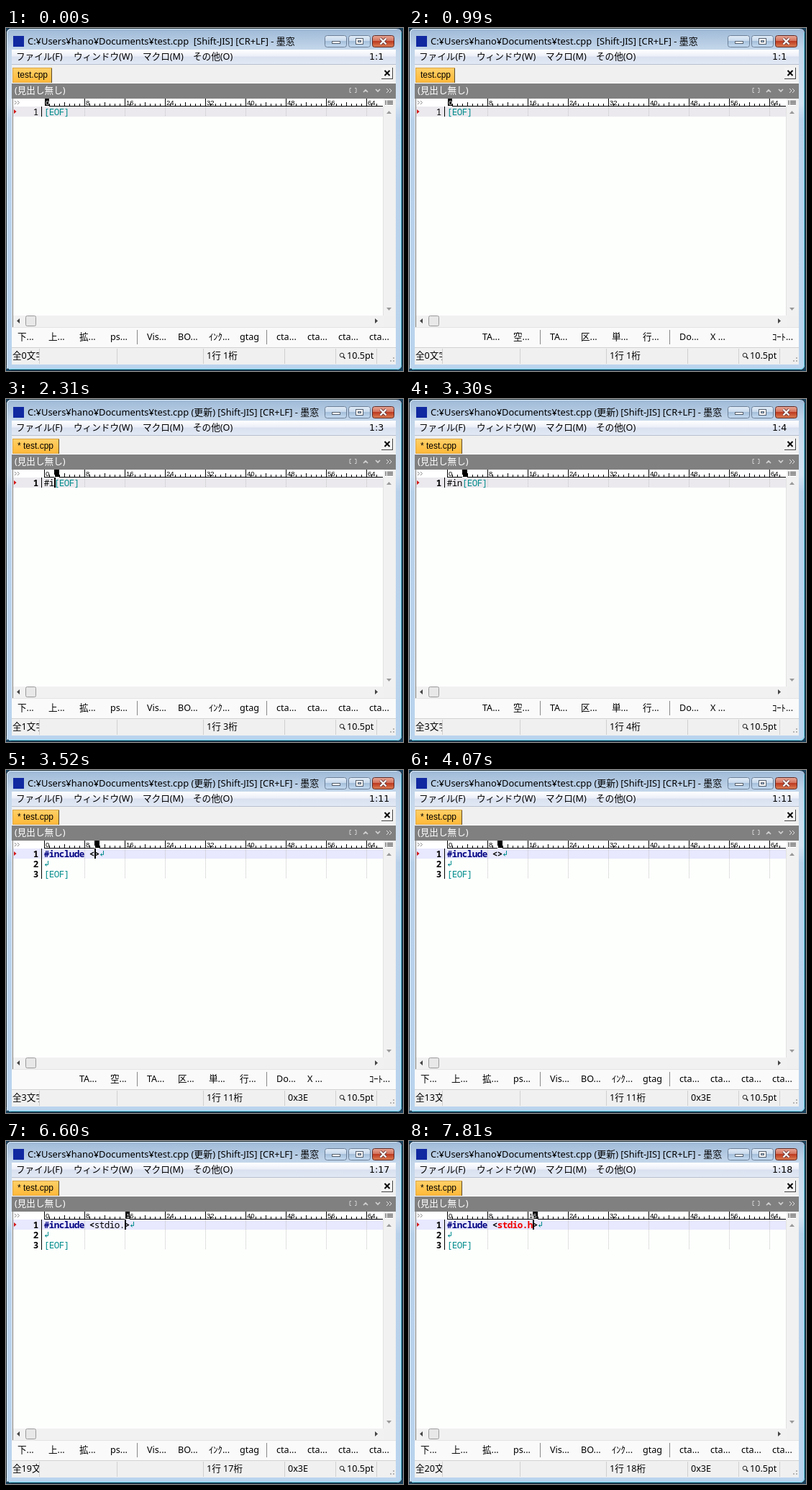
These frames come from a looping animation (552 px wide and 476 px high, 8000 ms). An HTML page:

```html
<!DOCTYPE html>
<html lang="ja">
<head>
<meta charset="utf-8">
<style>
html, body { margin: 0; width: 552px; height: 476px; overflow: hidden; }
svg { display: block; }
text { font: 12.6px "Noto Sans", "Noto Sans CJK JP", sans-serif; white-space: pre; }
.title { font-size: 12.9px; }
.tab { font: 12px "Liberation Sans", sans-serif; }
.ruler { font: 9.5px "Liberation Sans", sans-serif; }
.pos { font: 12.6px "DejaVu Sans", sans-serif; }
.code { font: 12.6px "Noto Sans Mono", monospace; text-anchor: middle; }
.bold { font-weight: bold; }
rect { shape-rendering: crispEdges; }
.round { shape-rendering: auto; }
.invert { mix-blend-mode: difference; }
</style>
</head>
<body>
<svg width="552" height="476">
  <defs>
    <linearGradient id="glass" x2="0" y2="1">
      <stop stop-color="#9db8d6"/><stop offset=".06" stop-color="#c3d6ea"/><stop offset=".22" stop-color="#d3e2f2"/>
      <stop offset=".27" stop-color="#b9d1ea"/><stop offset="1" stop-color="#bad4ee"/>
    </linearGradient>
    <linearGradient id="menu" x2="0" y2="1">
      <stop stop-color="#fff"/><stop offset=".45" stop-color="#eceff8"/><stop offset=".5" stop-color="#d9e0ef"/><stop offset="1" stop-color="#e2e9f5"/>
    </linearGradient>
    <linearGradient id="button" x2="0" y2="1">
      <stop stop-color="#e3edf8"/><stop offset=".48" stop-color="#c6d8ec"/><stop offset=".5" stop-color="#a6bfda"/><stop offset="1" stop-color="#c5dcf2"/>
    </linearGradient>
    <linearGradient id="close" x2="0" y2="1">
      <stop stop-color="#e8a898"/><stop offset=".48" stop-color="#d2705a"/><stop offset=".5" stop-color="#bd3a20"/><stop offset="1" stop-color="#dd8055"/>
    </linearGradient>
    <linearGradient id="tab" x2="0" y2="1">
      <stop stop-color="#ffd068"/><stop offset="1" stop-color="#ffb938"/>
    </linearGradient>
  </defs>
  <g id="frame"></g>
  <g id="live"></g>
</svg>
<script>
const LOOP = 8000, LEFT = 53, CELL = 7, LINE = 14;
const TEAL = '#008c8c', NAVY = '#000080';

const escape = s => s.replace(/</g, '&lt;').replace(/>/g, '&gt;');
const rect = (x, y, w, h, fill, extra = '') =>
  `<rect x="${x}" y="${y}" width="${w}" height="${h}" fill="${fill}" ${extra}/>`;
const text = (x, y, s, cls = '', fill = '#000') =>
  `<text x="${x}" y="${y}" class="${cls}" fill="${fill}">${escape(s)}</text>`;
const line = (d, color, width = 1, extra = '') =>
  `<path d="${d}" fill="none" stroke="${color}" stroke-width="${width}" ${extra}/>`;
const shape = (d, fill) => `<path d="${d}" fill="${fill}"/>`;
const repeat = (n, f) => Array.from({ length: n }, (_, i) => f(i)).join('');

// Text on the fixed character grid
function code(col, row, s, fill = '#000', bold = false) {
  const xs = [...s].map((_, i) => LEFT + (col + i + .5) * CELL).join(' ');
  return text(xs, 120.5 + row * LINE, s, bold ? 'code bold' : 'code', fill);
}

function windowFrame() {
  return rect(0, 0, 552, 476, '#17405c')
    + rect(.5, .5, 550, 474, 'url(#glass)', 'rx="6" class="round" stroke="#16242f"')
    + line('M1.500 473V8q0-6.500 6-6.500h536', '#e0f0fa')
    + line('M549.500 6v461q0 6.500-6 6.500H4', '#5cd4f2')
    + rect(10, 11, 15, 15, '#1028a0')
    + rect(443.5, 10.5, 30, 16, 'url(#button)', 'rx="3" class="round" stroke="#6c8098"')
    + rect(476.5, 10.5, 30, 16, 'url(#button)', 'rx="3" class="round" stroke="#6c8098"')
    + rect(509.5, 10.5, 30, 16, 'url(#close)', 'rx="3" class="round" stroke="#5f2a26"')
    + rect(453.5, 18.5, 11, 3, '#fff', 'stroke="#55606e"')
    + rect(486.5, 14.5, 10, 8, '#fff', 'stroke="#55606e"')
    + rect(489.5, 17.5, 4, 2, '#a6bfda', 'stroke="#55606e"')
    + line('M520.5 14.5l8 8m0-8l-8 8', '#6a3a3a', 4)
    + line('M520.5 14.5l8 8m0-8l-8 8', '#fff', 2.3)
    + rect(8, 30, 534, 437, '#f0f0f0')
    + rect(8, 30, 534, 20, 'url(#menu)')
    + rect(8, 50, 534, 1, '#b8c0cf')
    + text(14, 44, 'ファイル(F)') + text(94, 44, 'ウィンドウ(W)')
    + text(190, 44, 'マクロ(M)') + text(260, 44, 'その他(O)');
}

function header() {
  return rect(522, 55, 16, 16, '#444') + rect(522, 55, 15, 15, '#f4f4f4')
    + line('M526.5 59l7 7m0-7l-7 7', '#000', 2)
    + rect(8, 76, 534, 1, '#fff')
    + rect(8, 77, 534, 21, '#808080')
    + text(12, 91, '(見出し無し)', '', '#fff')
    + line('M480 83.500h-2v6h2m5 0h2v-6h-2', '#d0d0d0')
    + line('M497 89l3-3 3 3m11-4l3 3 3-3', '#d0d0d0', 1.7)
    + line('M529 84l3 3-3 3m4-6l3 3-3 3', '#e0e0e0');
}

function ruler() {
  const ticks = repeat(67, i => {
    const height = i % 8 == 0 ? 10 : i % 4 == 0 ? 5 : 3;
    return rect(LEFT + i * CELL, 108 - height, 1, height, '#000')
      + (i % 8 == 0 ? text(LEFT + 2 + i * CELL, 107, String(i), 'ruler') : '');
  });
  return rect(9, 98, 516, 11, '#fff') + ticks + rect(LEFT, 108, 471, 1, '#000')
    + line('M12 101l2.500 2.500-2.500 2.500m4-5l2.500 2.500-2.500 2.500', '#888')
    + rect(525, 98, 16, 11, '#f0f0f0')
    + line('M527 101.500h2m1 0h8m-11 2h2m1 0h8m-11 2h2m1 0h8', '#444')
    + rect(9, 109, 516, 290, '#fdfffd');
}

function scrollbars() {
  return rect(525, 109, 16, 290, '#f1f1f1') + rect(524, 109, 1, 290, '#e2e2e2')
    + shape('M529 119l3.500-4 3.500 4zM529 388l3.500 4 3.500-4z', '#999')
    + rect(9, 399, 516, 16, '#f1f1f1') + rect(525, 399, 16, 16, '#f0f0f0')
    + shape('M19 403v7l-4-3.500zM513 403v7l4-3.500z', '#444')
    + rect(27.5, 399.5, 14, 14, '#e8e8e8', 'rx="2" class="round" stroke="#9a9a9a"')
    + rect(8, 415, 534, 1, '#e3e3e3')
    + rect(9, 98, 1, 317, '#808080');
}

function statusBar() {
  const grip = [[538, 457], [534, 461], [538, 461]];
  return rect(8, 416, 534, 27, '#fafafa')
    + rect(182, 419, 1, 20, '#888') + rect(362, 419, 1, 20, '#888')
    + rect(8, 443, 534, 1, '#d2d2d2')
    + [46, 154, 274, 387, 458, 515].map(x => rect(x, 445, 1, 21, '#d0d0d0')).join('')
    + '<circle cx="467" cy="454" r="2.800" fill="#fff" stroke="#222"/>'
    + line('M469 456l2.500 3', '#222', 1.6)
    + text(474, 459, '10.5pt')
    + grip.map(([x, y]) => rect(x, y, 2, 2, '#b4b4b4')).join('');
}

document.getElementById('frame').innerHTML =
  windowFrame() + header() + ruler() + scrollbars() + statusBar();

const KEYS = ['下...', '上...', '拡...', 'ps...', 'Vis...', 'BO...', 'ｲﾝｸ...', 'gtag', 'cta...', 'cta...', 'cta...', 'cta...'];
const SHIFT_KEYS = ['', '', 'TA...', '空...', 'TA...', '区...', '単...', '行...', 'Do...', 'X ...', '', 'ｺｰﾄ...'];
const INCLUDE = '#include <';
const TYPED = [
  [0, ''], [1540, '#'], [2310, '#i'], [2420, '#in'], [3520, INCLUDE],
  [4950, INCLUDE + 's'], [5280, INCLUDE + 'st'], [5500, INCLUDE + 'std'],
  [5830, INCLUDE + 'stdi'], [5940, INCLUDE + 'stdio'],
  [6380, INCLUDE + 'stdio.'], [6820, INCLUDE + 'stdio.h']
];
const COUNTS = [
  [0, 0], [1650, 1], [2420, 2], [2530, 3], [3740, 13], [5060, 14],
  [5390, 15], [5610, 16], [5940, 17], [6160, 18], [6600, 19], [6930, 20]
];
const CARET_OFF = [[0, 440], [990, 1540], [2970, 3520], [4070, 4620], [7260, 7810]];
const SHIFT = [[990, 1870], [3300, 3740]];

const valueAt = (list, t) => list.filter(([start]) => start <= t).pop()[1];
const within = (spans, t) => spans.some(([a, b]) => t >= a && t < b);

function newline(col, row) {
  const x = LEFT + col * CELL, y = 112 + row * LINE;
  return line(`M${x + 5.5} ${y}v5.500h-4m2-2l-2 2 2 2`, TEAL);
}

function editor(typed, caret) {
  const expanded = typed.startsWith(INCLUDE), rows = expanded ? 3 : 1;
  const x = LEFT + typed.length * CELL;
  let out = rect(10, 109, 514, LINE, expanded ? '#e8e8ff' : '#ebe9ee')
    + repeat(8, i => line(`M${LEFT + 56.5 + i * 56} 109v${rows * LINE}`, '#c4c4c4', 1, 'stroke-dasharray="1 1"'))
    + rect(49, 109, 1, rows * LINE, '#000')
    + repeat(rows, i => code(-2.15, i, String(i + 1), '#000', typed !== ''))
    + shape('M11 113v6l3.500-3z', '#d01010');
  if (expanded) {
    const name = typed.slice(INCLUDE.length), done = name.endsWith('h');
    out += code(0, 0, '#include', NAVY, true) + code(9, 0, '<', '#000', true)
      + code(10, 0, name, done ? '#f00000' : '#000', done)
      + code(typed.length, 0, '>', '#000', true)
      + newline(typed.length + 1, 0) + newline(0, 1) + code(0, 2, '[EOF]', TEAL);
  } else {
    out += code(0, 0, typed) + code(typed.length, 0, '[EOF]', TEAL);
  }
  return out + (caret ? rect(x, 109, 2, LINE, '#000') : '')
    + rect(x, 98, CELL, 11, '#fff', 'class="invert"');
}

function scene(typed, count, caret, shift) {
  const changed = typed !== '', col = typed.length + 1, tabRight = changed ? 73.5 : 63.5;
  return text(30, 23, `C:¥Users¥hano¥Documents¥test.cpp ${changed ? '(更新)' : ''} [Shift-JIS] [CR+LF] - 墨窓`, 'title')
    + text(505, 44, '1:' + col, 'pos')
    + rect(9.5, 55.5, tabRight - 9.5, 20, 'url(#tab)', 'stroke="#d9a648"')
    + line(`M${tabRight} 56v20`, '#5c4a28')
    + text(16, 69, (changed ? '* ' : '') + 'test.cpp', 'tab')
    + editor(typed, caret)
    + (shift ? SHIFT_KEYS : KEYS).map((s, i) => text(16 + 43 * i + 8 * Math.floor(i / 4), 433, s)).join('')
    + `<svg x="9" y="444" width="37" height="22">${text(0, 15, `全${count}文字`)}</svg>`
    + text(279, 459, `1行 ${col}桁`)
    + (typed.startsWith(INCLUDE) ? text(392, 459, '0x3E') : '');
}

const live = document.getElementById('live');
let shown = '';
function draw() {
  const t = performance.now() % LOOP;
  const markup = scene(valueAt(TYPED, t), valueAt(COUNTS, t), !within(CARET_OFF, t), within(SHIFT, t));
  if (markup !== shown) live.innerHTML = shown = markup;
  requestAnimationFrame(draw);
}
draw();
</script>
</body>
</html>
```
